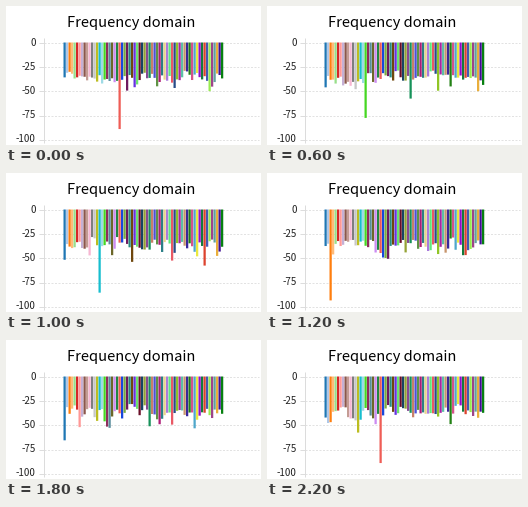
Recreate the animation shown at these times as a matplotlib script. Size 255x139 px, loop 2400 ms.

```python
import colorsys
import numpy as np
import matplotlib.pyplot as plt
from matplotlib.animation import FuncAnimation

W, H, DPI = 255, 139, 64
BINS, LEFT, PITCH, BAR_W = 64, 57.5, 2.5, 2.25
ZERO_Y, PX_PER_DB = 36.5, 0.967
FONT = "Noto Sans CJK JP"

# Deepest bin of each spectrum and its level below zero in dB
NOTCHES = [(22, 89.5), (15, 70), (19, 62), (16, 78), (30, 64), (14, 86),
           (2, 94), (40, 66), (28, 75), (0, 66), (12, 62), (22, 89.5)]


def spectrum(k):
    """Levels of a windowed burst of white noise, with one deep notch."""
    noise = np.random.default_rng(40 + k).normal(size=2 * BINS)
    power = np.abs(np.fft.rfft(noise * np.hanning(2 * BINS))[1:]) ** 2
    depth = 35.5 - 10 * np.log10(power / power.mean())
    depth = np.clip(depth, 28.5, 58)
    bin_, level = NOTCHES[k]
    depth[bin_] = level
    return depth


def palette():
    """Categorical colours first, then golden-ratio hues."""
    rng = np.random.default_rng(5)
    colors = [plt.cm.tab20(int(1.3 * i))[:3] for i in range(16)]
    for i in range(BINS - len(colors)):
        hue = (0.30 + 0.618 * i) % 1
        colors.append(colorsys.hsv_to_rgb(hue, rng.uniform(0.4, 0.95),
                                          rng.uniform(0.4, 0.95)))
    return colors


def label(x, y, s, px, color, ha):
    ax.text(x, y, s, fontsize=px * 72 / DPI, color=color, family=FONT,
            ha=ha, va="baseline")


def rule(xs, ys, color, **style):
    ax.plot(xs, ys, color=color, lw=72 / DPI, solid_capstyle="butt", **style)


spectra = [spectrum(k) for k in range(len(NOTCHES))]

fig = plt.figure(figsize=(W / DPI, H / DPI), dpi=DPI, facecolor="white")
ax = fig.add_axes([0, 0, 1, 1])
ax.axis("off")

label(125, 21, "Frequency domain", 14.65, "black", "center")
for db in range(0, 101, 25):
    y = int(ZERO_Y + PX_PER_DB * db) + 0.5
    rule([38, 253], [y, y], "#e2e2e2", dashes=(2, 1.5))
    rule([33, 38], [y, y], "#dddddd")
    label(29.7, y + 3, f"{-db}", 9.8, "#222222", "right")
rule([37.5, 37.5], [32, 137], "#dcdcdc")

bars = ax.bar(LEFT + PITCH * np.arange(BINS), spectra[0] * PX_PER_DB, BAR_W,
              bottom=ZERO_Y, align="edge", color=palette(),
              linewidth=0, snap=False, zorder=3)
ax.set_xlim(0, W)
ax.set_ylim(H, 0)


def update(f):
    # The second spectrum comes 300 ms in; later ones last 200 ms each
    k = f // 3 if f < 4 else f // 2
    for bar, depth in zip(bars, spectra[k]):
        bar.set_height(depth * PX_PER_DB)
    return list(bars)


anim = FuncAnimation(fig, update, frames=24, interval=100, repeat=True,
                     repeat_delay=0, blit=False)
plt.show()
```
